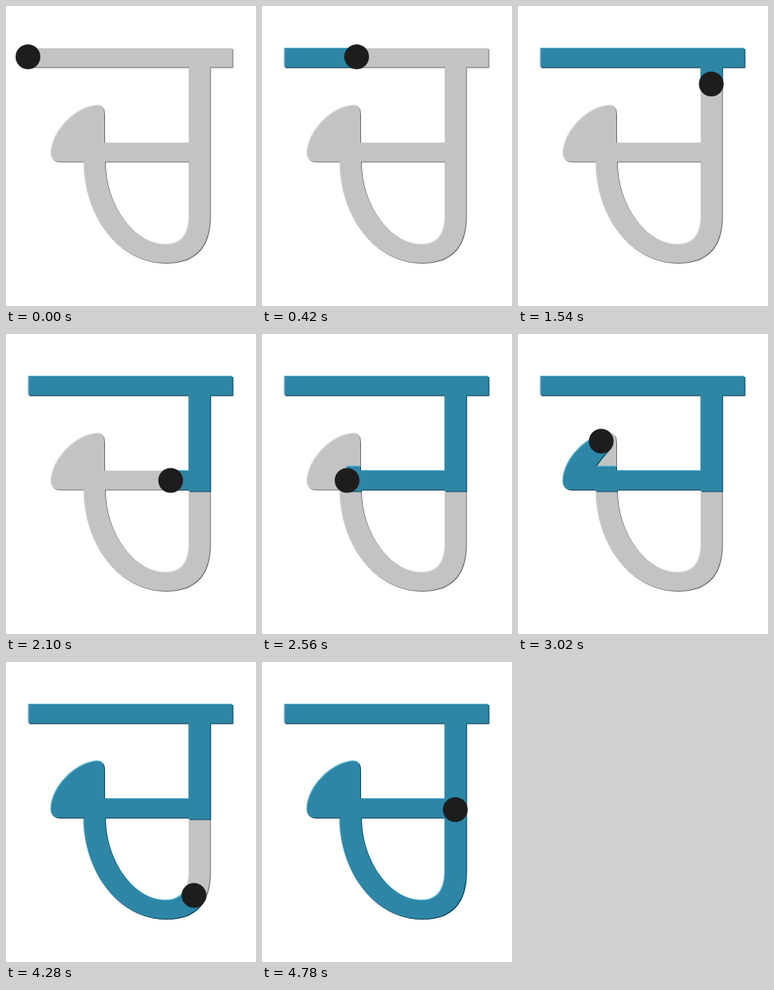
These frames come from a looping animation (313x375 px, 4800 ms). An HTML page:

```html
<!DOCTYPE html>
<html lang="en">
<head>
<meta charset="utf-8">
<title>Letter stroke order</title>
<style>
  html, body { margin: 0; width: 100%; height: 100%; overflow: hidden; background: #fff; }
  svg { display: block; width: 313px; height: 375px; }
  .bevel { filter: drop-shadow(1.4px 1.2px 0 var(--dark)) drop-shadow(-1px -1px 0 var(--light)); }
  .base { --dark: #707070; --light: #ededed; fill: #c3c3c3; }
  .ink { --dark: #0f4a60; --light: #62c3dc; fill: #2e86a6; }
</style>
</head>
<body>
<svg viewBox="0 0 313 375">
  <defs>
    <path id="glyph" fill-rule="evenodd" d="M28.500 53H283.500V76.500H255.500V262C255.500 300 238 321 200 321C140 321 97.500 262 97.500 194.500H68
      Q56.500 195 56.500 185C56.500 155 90 124 116 124Q123 124 123 135V171H229V76.500H28.500Z
      M124 194.500C124 250 162 298 200 298C220 298 229 285 229 262V194.500Z"/>
    <mask id="reveal" maskUnits="userSpaceOnUse" x="0" y="0" width="313" height="375">
      <path id="route" transform="translate(0 -2)" fill="none" stroke="#fff" stroke-width="31"
        d="M27.500 63.500H284.500H242V183H68Q83 157 104 134L110 131L111 196
        C111 255 150 310 200 310C232 310 242 287 242 262V183"/>
    </mask>
  </defs>
  <g class="bevel base"><use href="#glyph"/></g>
  <g class="bevel ink"><g mask="url(#reveal)"><use href="#glyph"/></g></g>
  <circle id="dot" r="15.5" fill="#1d1d1d"/>
</svg>
<script>
  const LOOP = 4800, STEP = 20, SPEED = 0.2166; // ms, ms, px per ms
  const route = document.getElementById('route');
  const dot = document.getElementById('dot');
  const total = route.getTotalLength();

  function draw() {
    const time = Math.floor(performance.now() % LOOP / STEP) * STEP;
    const length = Math.min(time * SPEED, total);
    const { x, y } = route.getPointAtLength(length);
    route.setAttribute('stroke-dasharray', `${length} ${total * 2}`);
    dot.setAttribute('cx', x);
    dot.setAttribute('cy', y);
    requestAnimationFrame(draw);
  }
  draw();
</script>
</body>
</html>
```
